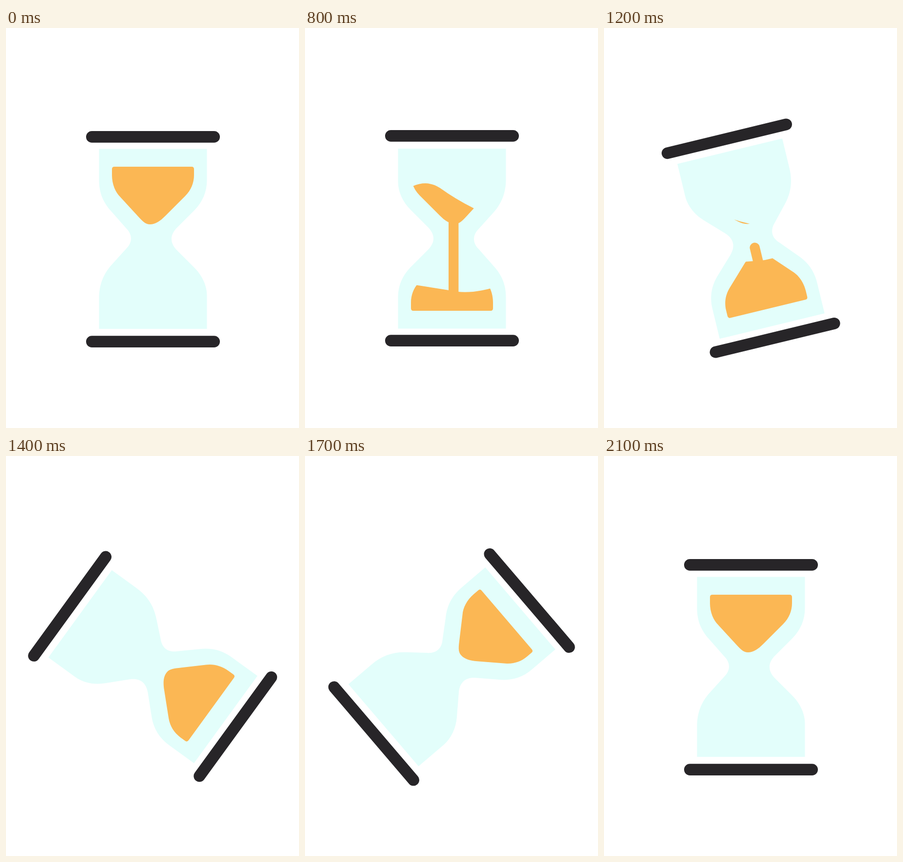
An HTML page for the animation above (2.2 s loop, 600x819 px).

```html
<!DOCTYPE html>
<html lang="en">
<head>
<meta charset="utf-8">
<title>Hourglass</title>
<style>
  html, body { margin: 0; width: 100%; height: 100%; overflow: hidden; background: #fff; }
  svg { display: block; width: 100%; height: 100%; }
  .bar { fill: #272528; }
  .glass { fill: #e3fefb; }
  .sand { fill: #fbb754; }
  .stream { stroke: #fbb754; stroke-width: 20.4; stroke-linecap: round; }
</style>
</head>
<body>
<svg viewBox="0 0 600 819">
  <defs>
    <path id="heap" d="M222 283H380Q385 283 385 288V300C385 319 378 335 368 345L334 382C323 394 317 401 307 401C296 401 286 394 276 384L235 343C223 331 217 316 217 300V288Q217 283 222 283Z"/>
    <!-- Sand surfaces, drawn around their own origin and moved by the script -->
    <clipPath id="upperClip">
      <path id="hump" d="M-180 67L-28 10.5Q3 -3 28 14Q60 37 96 55L200 112V400H-180Z"/>
    </clipPath>
    <clipPath id="lowerClip">
      <path id="dip" d="M200 -18L295 -3Q340 8 400 -13V400H200Z"/>
    </clipPath>
  </defs>
  <g id="timer">
    <rect class="bar" x="164" y="209" width="274" height="23.8" rx="11.9"/>
    <rect class="bar" x="164" y="628.2" width="274" height="23.8" rx="11.9"/>
    <path class="glass" d="M190.5 247H411.5V310C411.5 338 402 361 384 380L356 411C342.7 424 342.7 440 356 453L385 486C402 504 411.5 524 411.5 552V615.5H190.5V552C190.5 528 199 508 215 491L252 454C266.7 439 266.7 423 252 408L216 372C200 356 190.5 335 190.5 315Z"/>
    <g clip-path="url(#upperClip)"><use class="sand" href="#heap"/></g>
    <g clip-path="url(#lowerClip)"><use class="sand" href="#heap" transform="matrix(1 0 0 -1 0 862)"/></g>
    <line id="stream" class="stream" x1="304.2" x2="304.2"/>
  </g>
</svg>
<script>
const LOOP = 2200, STEP = 100;
const TURN_START = 1000, TURN_GAP = 200;
const turn = [0, 13.6, 54, 95.5, 162.5, 180];

const $ = id => document.getElementById(id);
const set = (id, name, value) => $(id).setAttribute(name, value);

// Smooth curve through evenly spaced points, at rest at both ends.
function spline(points, u) {
  const last = points.length - 1;
  u = Math.min(last, Math.max(0, u));
  const i = Math.min(last - 1, Math.floor(u)), f = u - i;
  const slope = n => n === 0 || n === last ? 0 : (points[n + 1] - points[n - 1]) / 2;
  const ease = f * f * (3 - 2 * f);
  return points[i] + (points[i + 1] - points[i]) * ease
    + slope(i) * f * (1 - f) ** 2 - slope(i + 1) * f * f * (1 - f);
}

function draw(now) {
  // The first step still shows the fully turned glass.
  const t = Math.floor((now % LOOP) / STEP) * STEP || LOOP;

  // The upper surface slides down and left, ever slower; the lower one rises steadily.
  const slide = 150 * (1 - 0.636 ** ((t - 400) / 400));
  set("hump", "transform", `translate(${303 - slide} ${259 + slide})`);
  set("dip", "transform", `translate(0 ${540 - 0.15 * (t - 800)})`);

  const top = Math.max(399, 451 + 0.5 * (t - 1200));
  const end = Math.min(560, 456 + 0.38 * (t - 400));
  set("stream", "y1", top);
  set("stream", "y2", end);
  set("stream", "visibility", end > top ? "visible" : "hidden");

  const angle = spline(turn, (t - TURN_START) / TURN_GAP);
  set("timer", "transform", `rotate(${-angle} 301 431.5)`);
}

const start = performance.now();
function tick() {
  draw(performance.now() - start);
  requestAnimationFrame(tick);
}
tick();
</script>
</body>
</html>
```
